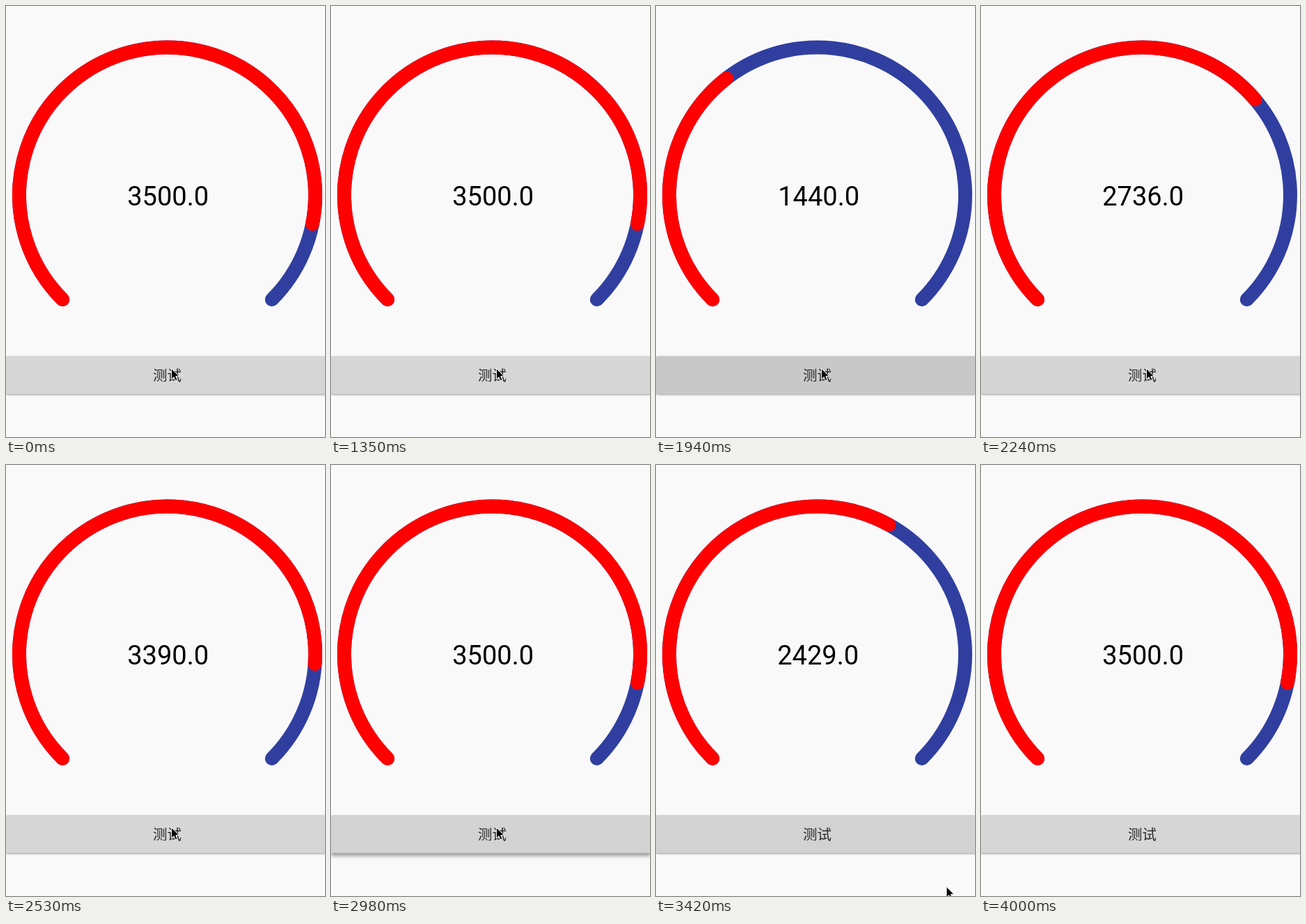
Animation of 458x620 px, one loop 4.15 s. Source, as an HTML page:

```html
<!DOCTYPE html>
<html lang="zh">
<head>
<meta charset="utf-8">
<title>Gauge</title>
<style>
html, body { margin: 0; width: 100%; height: 100%; overflow: hidden; background: #faf9fa; }
svg { display: block; width: 458px; height: 620px; }
.arc { fill: none; stroke-width: 20; stroke-linecap: round; }
#value { font: 400 38px Roboto, sans-serif; }
#label { font: 500 20.5px "Noto Sans CJK SC", "Noto Sans CJK", sans-serif; text-anchor: middle; fill: #2b2b2c; }
</style>
</head>
<body>
<svg viewBox="0 0 458 620">
  <defs>
    <filter id="shade" filterUnits="userSpaceOnUse" x="-20" y="480" width="500" height="120"
            color-interpolation-filters="sRGB">
      <feDropShadow id="drop" dx="0" dy="1.5" stdDeviation="1" flood-color="#000"/>
    </filter>
  </defs>
  <path id="track" class="arc" stroke="#303f9f"/>
  <path id="bar" class="arc" stroke="#f00"/>
  <text id="value" y="287"></text>
  <rect id="button" x="0" y="503.5" width="459" height="54.5" rx="2.5" filter="url(#shade)"/>
  <text id="label" x="231.5" y="538.7">测试</text>
  <path id="cursor" d="M0 0V15.5L3.6 12.2 6 17.6 8.6 16.5 6.3 11.2H11Z"
        fill="#000" stroke="#fff" stroke-width="1" stroke-linejoin="round"/>
</svg>
<script>
const LOOP = 4150, CX = 231.5, CY = 272, R = 212.5;
const GOAL = 3500, MAX = 4000, RUN = 1000;
const STARTS = [1707.2, 2973.2];
// The screen refreshes only at these moments
const TICKS = [0, 1350, 1640, 1790, 1940, 2090, 2240, 2390, 2530, 2680,
  2830, 2980, 3120, 3270, 3420, 3560, 3710, 3850, 4000];
// Button response around the start of a run: [ms, amount]
const LIFT = [[-150, 0], [-60, .8], [7, 1], [83, .4], [150, .15], [220, 0]];
const TINT = [[-150, 0], [-60, .15], [7, .25], [83, .85], [147, 1], [233, 1], [447, .25], [560, 0]];

const el = id => document.getElementById(id);
const set = (node, attrs) => {
  for (const k in attrs) node.setAttribute(k, attrs[k]);
};
const clamp = v => Math.min(1, Math.max(0, v));
const mix = (a, b, k) => a + (b - a) * k;
const easeOut = (k, power) => 1 - Math.pow(1 - k, power);

function ramp(points, x) {
  if (x <= points[0][0]) return points[0][1];
  for (let i = 1; i < points.length; i++) {
    const [x0, y0] = points[i - 1], [x1, y1] = points[i];
    if (x <= x1) return mix(y0, y1, (x - x0) / (x1 - x0));
  }
  return points[points.length - 1][1];
}

function arc(sweep) {
  const at = deg => {
    const a = deg * Math.PI / 180;
    return (CX + R * Math.cos(a)).toFixed(2) + " " + (CY + R * Math.sin(a)).toFixed(2);
  };
  return `M${at(135)}A${R} ${R} 0 ${sweep > 180 ? 1 : 0} 1 ${at(135 + sweep)}`;
}

const pen = document.createElement("canvas").getContext("2d");
const nodes = {};
for (const id of ["track", "bar", "value", "button", "drop", "cursor"]) nodes[id] = el(id);
set(nodes.track, { d: arc(270) });

function drawGauge(t) {
  // The new value reaches the screen shortly after the run begins
  const start = STARTS.filter(s => t > s + 15).pop();
  const p = start === undefined ? 1 : clamp((t - start) / RUN);
  const value = Math.round(GOAL * easeOut(p, 2));
  const text = value.toFixed(1);
  pen.font = "400 38px Roboto, sans-serif";
  const m = pen.measureText(text);
  const ink = m.actualBoundingBoxLeft + m.actualBoundingBoxRight;
  set(nodes.bar, { d: arc(value / MAX * 270) });
  set(nodes.value, { x: CX - ink / 2 });
  nodes.value.textContent = text;
}

function drawButton(t) {
  const most = points => Math.max(...STARTS.map(s => ramp(points, t - s)));
  const lift = most(LIFT), grey = Math.round(mix(214, 200, most(TINT)));
  set(nodes.button, { fill: `rgb(${grey},${grey},${grey})` });
  set(nodes.drop, {
    dy: mix(1.5, 4.5, lift),
    stdDeviation: mix(1, 2.6, lift),
    "flood-opacity": mix(.32, .36, lift)
  });
}

function drawCursor(t) {
  const k = clamp((t - 3120) / 300);
  const x = mix(237.5, 417, easeOut(k, 3.5)), y = mix(521.5, 606.5, easeOut(k, 2.5));
  set(nodes.cursor, {
    transform: `translate(${x} ${y})`,
    visibility: t < 3560 ? "visible" : "hidden"
  });
}

function draw(ms) {
  const now = ms % LOOP;
  const t = TICKS.filter(tick => tick <= now).pop();
  drawGauge(t);
  drawButton(t);
  drawCursor(t);
}

const begin = performance.now();
function frame(now) {
  draw(Math.max(0, now - begin));
  requestAnimationFrame(frame);
}
draw(0);
requestAnimationFrame(frame);
</script>
</body>
</html>
```
